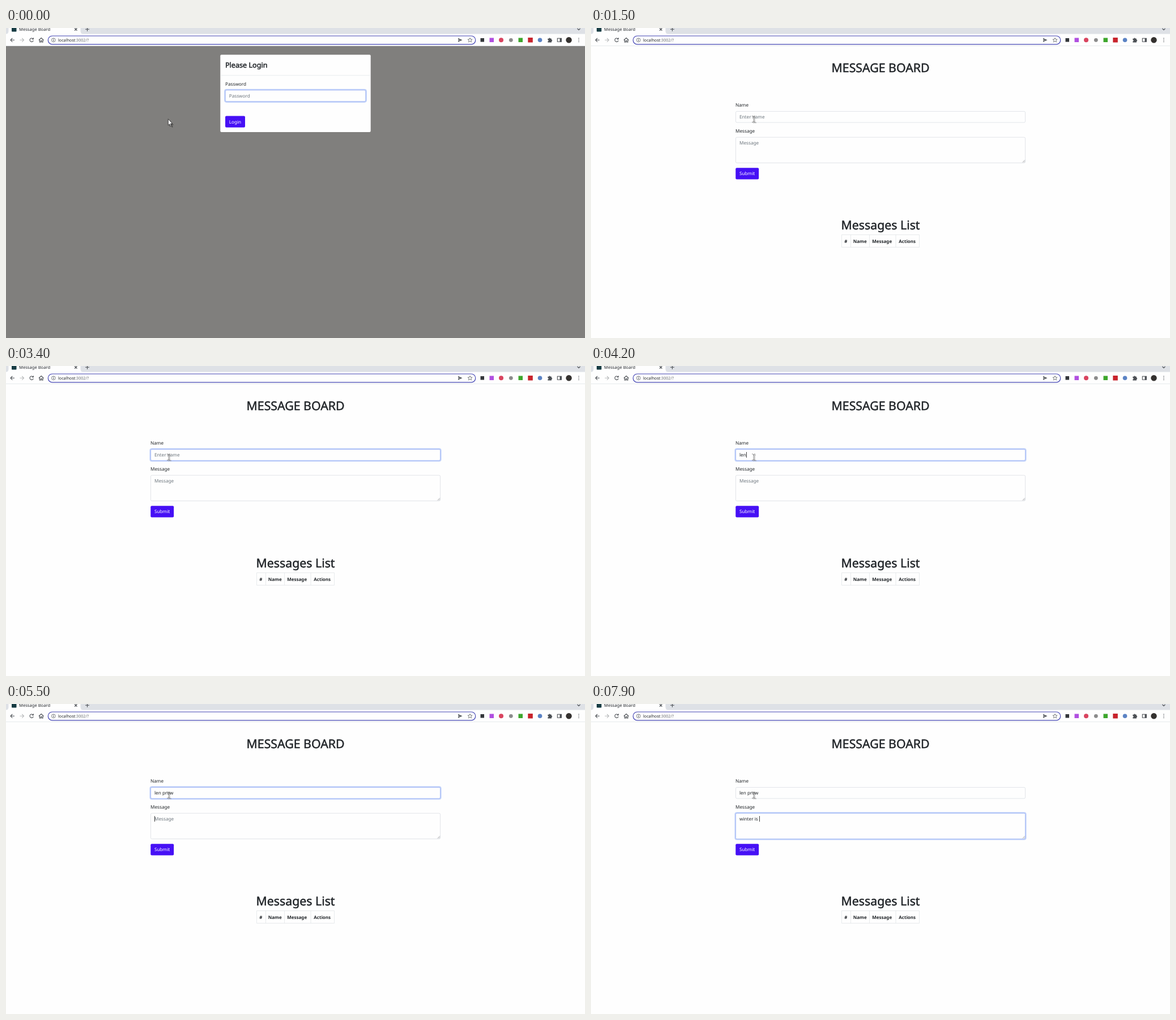
An HTML page for the animation above (8000 ms loop, 1022 px wide and 548 px high).

```html
<!DOCTYPE html>
<html lang="en">
<head>
<meta charset="utf-8">
<title>Message Board</title>
<style>
  html, body { margin: 0; width: 100%; height: 100%; overflow: hidden; background: #fefefe; }
  svg { display: block; width: 1022px; height: 548px; }
  text { font: 8.2px "Noto Sans", "Open Sans", sans-serif; fill: #212529; white-space: pre; text-rendering: geometricPrecision; }
  .hint { fill: #6c757d; }
  .title { stroke: #212529; stroke-width: .5; }
  .big { font-size: 21.300px; text-anchor: middle; }
  .head { font-size: 8px; font-weight: 700; }
  .on-button { fill: #fff; }
  .button { fill: #4610f5; }
  .box { fill: #fefefe; stroke: #ced4da; stroke-width: .6; }
  .glow { fill: none; stroke: #c3d3fa; stroke-width: 4.2; }
  .focus { fill: #fefefe; stroke: #8fa6f2; stroke-width: .7; }
  .rule { fill: none; stroke: #dee2e6; stroke-width: .7; }
  .icon { fill: none; stroke: #4b4f54; stroke-width: 1.1; }
  .fine { stroke-width: .7; }
  .caret { fill: #111; }
</style>
</head>
<body>
<svg viewBox="0 0 1022 548">
  <g id="chrome">
    <path fill="#dee1e6" d="M0 0H1022V11H0Z"/>
    <path fill="#fefefe" d="M0 10.500Q4.500 10.500 4.500 5V0H131.500V5Q131.500 10.500 136 10.500H1022V32H0Z"/>
    <path class="rule" d="M0 31.500H1022"/>
    <rect x="10" y="-2" width="8.500" height="8.500" rx="1" fill="#163c43"/>
    <text x="23" y="5" style="font-size:7.6px">Message Board</text>
    <path class="icon" d="M121 0l4.500 4.500M125.500 0l-4.500 4.500M140 2.200h7M143.500-1v6.700M1008.500 1l2.500 2.500 2.500-2.500"/>
    <path class="icon" d="M15 21.300H8M11.300 18l-3.300 3.300 3.300 3.300"/>
    <path class="icon" stroke-opacity=".4" d="M24.500 21.300h7M28.200 18l3.300 3.300-3.300 3.300"/>
    <path class="icon" d="M47.800 19.300a3.200 3.200 0 1 0 .5 2.800M48.300 17.300v2.500h-2.500"/>
    <path class="icon" d="M58 21.500l4.200-4 4.200 4M59.300 21v4h2v-2.500h1.800V25h2v-4"/>
    <rect x="74.300" y="14" width="754.400" height="14.900" rx="7.400" fill="#fefefe" stroke="#4345b4" stroke-width="1.200"/>
    <circle class="icon fine" cx="83.800" cy="21.300" r="3.400"/>
    <path class="icon" d="M83.800 20.800v2.500M83.800 19v.9"/>
    <text x="92" y="24" style="font-size:7.150px">localhost<tspan fill="#6b6f74">:3002/?</tspan></text>
    <path fill="#4b4f54" d="M798 18l7.500 3.300-7.500 3.300v-2.600l4.500-.7-4.500-.7z"/>
    <path class="icon fine" d="M819 17.400l1.100 2.600 2.900.2-2.200 1.900.7 2.800-2.500-1.500-2.500 1.500.7-2.800-2.200-1.900 2.900-.2z"/>
    <rect x="837.500" y="18" width="6.500" height="6.500" fill="#33363a"/>
    <rect x="853.500" y="17.500" width="7.500" height="7.500" fill="#b04fe0"/>
    <circle cx="874" cy="21.300" r="4" fill="#d9445f"/>
    <circle cx="891.300" cy="21.300" r="3.400" fill="#8b8b8b"/>
    <rect x="904.500" y="17.500" width="7.500" height="7.500" fill="#3da62c"/>
    <rect x="921.300" y="17" width="8.500" height="8.500" fill="#c8232c"/>
    <circle cx="942.500" cy="21.300" r="3.800" fill="#5b83c4"/>
    <path fill="#4b4f54" d="M956.300 18.800h2a1.300 1.300 0 0 1 2.600 0h2v2.100a1.300 1.300 0 0 1 0 2.600v2h-6.600v-2a1.300 1.300 0 0 0 0-2.600z"/>
    <path class="icon" d="M973.300 18.300h7v6h-7z"/>
    <path fill="#4b4f54" d="M977.500 18h3v6.500h-3z"/>
    <circle cx="993.500" cy="21.300" r="5.200" fill="#34312f"/>
    <path stroke="#4b4f54" stroke-width="1.600" stroke-linecap="round" d="M1011 18.300v0M1011 21.300v0M1011 24.300v0"/>
  </g>

  <g id="login">
    <path fill="#807f7d" d="M0 32H1022V548H0Z"/>
    <rect x="378.300" y="47.300" width="265.400" height="136.700" rx="2" fill="#fefefe"/>
    <path class="rule" d="M378.300 83.800H643.700"/>
    <text class="title" x="387" y="69.700" style="font-size:12.600px">Please Login</text>
    <text x="387" y="102">Password</text>
    <rect class="glow" x="387.200" y="109.900" width="247.600" height="19.900" rx="2"/>
    <rect class="focus" x="387.200" y="109.900" width="247.600" height="19.900" rx="2"/>
    <text id="passwordHint" class="hint" x="393.700" y="123">Password</text>
    <circle id="bullet" cx="395.600" cy="120" r="1.400"/>
    <rect id="passwordCaret" class="caret" y="115" width=".8" height="10"/>
    <rect class="button" x="387" y="155.500" width="35" height="20.200" rx="2"/>
    <text class="on-button" x="393.700" y="168.800">Login</text>
    <path fill="#0005" d="M288.500 162.500v12l2.500-2 2 3.500 2-1-1.800-3.500h3z"/>
    <path fill="#fff" stroke="#222" stroke-width=".8" d="M286.300 160.800v11.200l2.500-2.300 1.700 3.800 1.600-.8-1.700-3.600h3.300z"/>
  </g>

  <g id="board">
    <text class="title big" x="511" y="77.500">MESSAGE BOARD</text>
    <text x="255" y="139.300">Name</text>
    <rect class="box" x="255.500" y="147.400" width="511" height="19.600" rx="2"/>
    <g id="nameRing">
      <rect class="glow" x="255.500" y="147.400" width="511" height="19.600" rx="2"/>
      <rect class="focus" x="255.500" y="147.400" width="511" height="19.600" rx="2"/>
    </g>
    <text id="nameText" x="262" y="160"></text>
    <rect id="nameCaret" class="caret" y="152" width=".8" height="10"/>
    <text x="255" y="185.300">Message</text>
    <rect class="box" x="255.500" y="193.200" width="511" height="45.300" rx="2"/>
    <g id="messageRing">
      <rect class="glow" x="255.500" y="193.200" width="511" height="45.300" rx="2"/>
      <rect class="focus" x="255.500" y="193.200" width="511" height="45.300" rx="2"/>
    </g>
    <path class="icon" style="stroke-width:.5" d="M761.800 237.500l4-4M764 237.500l1.800-1.800"/>
    <text id="messageText" x="262" y="206"></text>
    <rect id="messageCaret" class="caret" y="198" width=".8" height="10"/>
    <rect class="button" x="255.300" y="247.200" width="40.900" height="20.200" rx="2"/>
    <text class="on-button" x="262" y="260.300">Submit</text>
    <text class="title big" x="511" y="355.800">Messages List</text>
    <path class="rule" d="M442.500 365.500H579.500V387.500H442.500ZM458.500 365.500v22M491.500 365.500v22M538 365.500v22"/>
    <text class="head" x="447.300" y="379.800">#</text>
    <text class="head" x="462.700" y="379.800">Name</text>
    <text class="head" x="496.300" y="379.800">Message</text>
    <text class="head" x="543.300" y="379.800">Actions</text>
    <path fill="none" stroke="#8887" stroke-width="2" d="M286 157.500h5M288.800 157.500v9.500M285.500 167.300h6.500"/>
    <path fill="none" stroke="#888" stroke-width=".9" d="M284 155.500q3 0 3 1.500q0-1.500 3-1.500M287 157v8.500M284 166.500q3 0 3-1.500q0 1.500 3 1.500"/>
  </g>
</svg>
<script>
const LOOP = 8000;
const $ = id => document.getElementById(id);
const show = (id, on) => $(id).setAttribute("visibility", on ? "inherit" : "hidden");

// Each step is [time, number of characters typed].
const fields = {
  name: {
    value: "len prow", hint: "Enter name",
    steps: [[3800, 1], [3900, 2], [4200, 3], [4300, 4], [4500, 5], [4700, 6], [4900, 7], [5100, 8]],
    caret: t => t >= 2800 && t < 3400 || t >= 3800 && t < 5500,
    ring: t => t < 2900 || t >= 5600 ? 0 : t < 3000 ? 0.6 : 1
  },
  message: {
    value: "winter is ", hint: "Message",
    steps: [[6200, 1], [6400, 3], [6700, 4], [7000, 5], [7300, 7], [7700, 9], [7900, 10]],
    caret: t => t >= 5500,
    ring: t => t < 5600 ? 0 : 1
  }
};

function drawField(id, field, t) {
  const count = field.steps.reduce((n, [time, typed]) => t >= time ? typed : n, 0);
  const text = $(id + "Text");
  text.textContent = count ? field.value.slice(0, count) : field.hint;
  text.setAttribute("class", count ? "" : "hint");
  const width = count ? text.getComputedTextLength() : 0;
  $(id + "Caret").setAttribute("x", 262.2 + width);
  show(id + "Caret", field.caret(t));
  $(id + "Ring").setAttribute("opacity", field.ring(t));
}

function draw() {
  const t = performance.now() % LOOP;
  const typed = t >= 1000;
  show("login", t < 1500);
  show("board", t >= 1500);
  if (t < 1500) {
    show("passwordHint", !typed);
    show("bullet", typed);
    show("passwordCaret", t >= 600);
    $("passwordCaret").setAttribute("x", typed ? 396.5 : 394.1);
  } else {
    for (const id in fields) drawField(id, fields[id], t);
  }
  requestAnimationFrame(draw);
}
draw();
</script>
</body>
</html>
```
